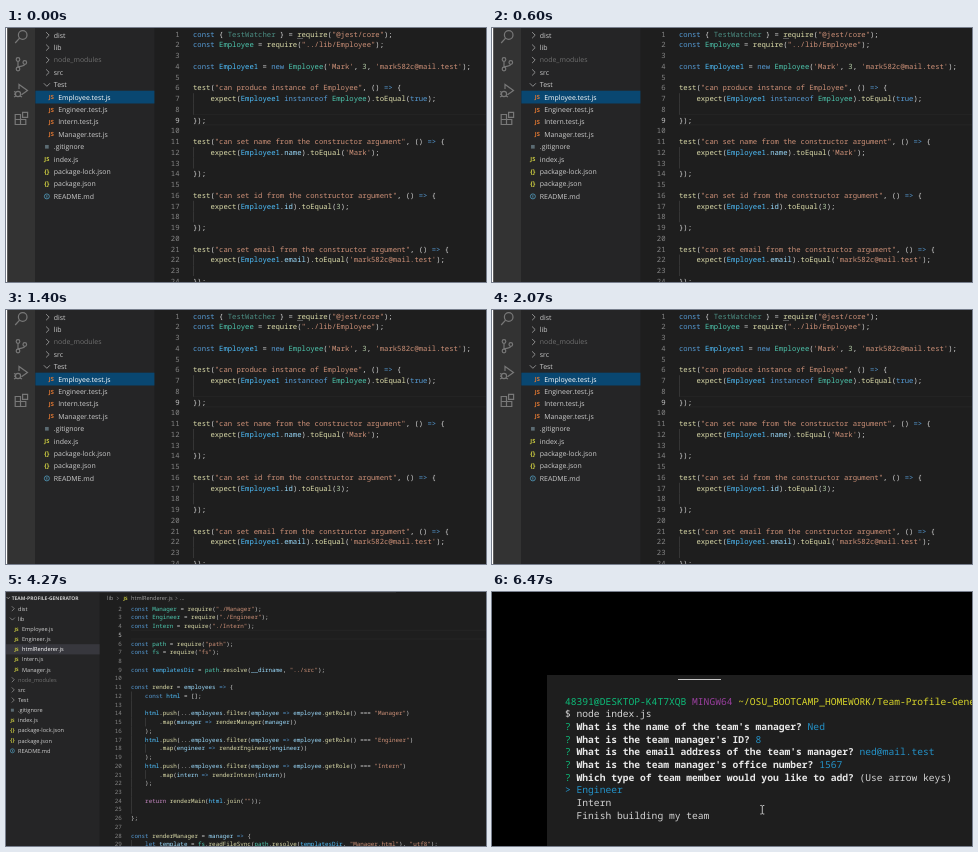
Recreate the animation shown at these times as an HTML page. Size 480 by 254 pixels, loop 8 s.

```html
<!DOCTYPE html>
<html lang="en">
<head>
<meta charset="utf-8">
<title>Team profile generator</title>
<style>
  html, body { margin: 0; width: 100%; height: 100%; overflow: hidden; background: #000; }
  #reel { display: block; animation: cuts 8s step-end infinite; }
  @keyframes cuts {
    0% { transform: translateY(0); }
    26.625% { transform: translateY(-254px); }
    53.375% { transform: translateY(-508px); }
    80%, 100% { transform: translateY(-762px); }
  }
  text { white-space: pre; text-rendering: geometricPrecision; fill: #d4d4d4; }
  .mono { font-family: "Noto Sans Mono", "DejaVu Sans Mono", monospace; }
  .code { font-weight: 500; }
  .ui { font-family: "Open Sans", "Noto Sans", sans-serif; fill: #ccc; }
  .b { font-weight: 700; fill: #e8e8e8; }
  .line { fill: none; stroke: #787878; }
</style>
</head>
<body>
<svg id="reel" width="480" height="1016"></svg>
<script>
const rect = (x, y, w, h, fill) => `<rect x="${x}" y="${y}" width="${w}" height="${h}" fill="${fill}"/>`;
const path = (d, stroke = '#858585', width = 1) =>
  `<path d="${d}" fill="none" stroke="${stroke}" stroke-width="${width}"/>`;
const text = (cls, x, y, size, body, extra = '') =>
  `<text class="${cls}" x="${x}" y="${y + size * 0.35}" font-size="${size}" ${extra}>${body}</text>`;
const ui = (x, y, size, body, fill = '#ccc', extra = '') =>
  text('ui', x, y, size, body, `style="fill:${fill}" ${extra}`);
const tint = (fill, body, extra = '') => `<tspan style="fill:${fill}" ${extra}>${body}</tspan>`;
const bold = body => `<tspan class="b">${body}</tspan>`;

// string, keyword, control, number, unused, constant, type, function, variable
const colors = ['#ce9178', '#569cd6', '#c586c0', '#b5cea8', '#4c8f84', '#4fc1ff', '#4ec9b0', '#dcdcaa', '#9cdcfe'];
const tokens = new RegExp([
  `("[^"]*"|'[^']*')`,
  '(=>|\\b(?:const|let|new|instanceof|true)\\b)',
  '\\b(return)\\b',
  '\\b(\\d+)\\b',
  '\\b(TestWatcher)\\b',
  '\\b(Employee1|templatesDir|html)\\b',
  '\\b(Employee|Manager|Engineer|Intern|path|fs)\\b',
  '(\\w+(?=\\()|\\brender(?:Manager)?\\b)',
  '(\\w+)'
].join('|'), 'g');
const paint = src => src.replace(tokens, (m, ...groups) =>
  tint(colors[groups.findIndex(g => g !== undefined)], m));

function code(lines, o) {
  let depth = 0;
  return lines.map((src, i) => {
    const n = o.first + i, y = o.y + i * o.pitch;
    if (src) depth = src.search(/\S/) / 4;
    // blank lines keep the indent guides of the line above
    const guides = Array.from({ length: depth }, (_, d) =>
      rect(o.x + d * 2.4 * o.size, y - o.pitch / 2, 0.7, o.pitch, '#404040')).join('');
    return guides + text('mono', o.numX, y, o.size, n,
        `text-anchor="end" style="fill:${n === o.current ? '#c6c6c6' : '#858585'}"`) +
      text('mono code', o.x, y, o.size, paint(src));
  }).join('');
}

// Each row: kind, label, depth
function tree(rows, o) {
  const s = o.size;
  return rows.map(([kind, label, depth = 0], i) => {
    const y = o.y + i * o.pitch, x = o.x + depth * o.indent, ix = x - s;
    const r = s * 0.22;
    const icon = {
      shut: () => path(`M${ix - r / 2} ${y - 2 * r}l${2 * r} ${2 * r}l${-2 * r} ${2 * r}`, '#bbb', s * 0.1),
      open: () => path(`M${ix - 2 * r} ${y - r}l${2 * r} ${2 * r}l${2 * r} ${-2 * r}`, '#bbb', s * 0.1),
      js: () => mark(ix, y, s, 'JS', '#cbcb41'),
      test: () => mark(ix, y, s, 'JS', '#e37933'),
      json: () => mark(ix, y, s * 1.15, '{}', '#cbcb41'),
      git: () => rect(ix - r * 1.2, y - r * 1.2, r * 2.4, r * 2.4, '#5b6b73'),
      info: () => `<circle cx="${ix}" cy="${y}" r="${s * 0.36}" class="line" style="stroke:#519aba" stroke-width="${s * 0.12}"/>` +
        rect(ix - s * 0.06, y - s * 0.17, s * 0.12, s * 0.34, '#519aba')
    }[kind]();
    return icon + ui(x, y, s, label, label === 'node_modules' ? '#6f6f6f' : label === o.selected ? '#fff' : '#ccc');
  }).join('');
}
const mark = (x, y, s, label, fill) =>
  ui(x, y, s * 0.82, label, fill, 'text-anchor="middle" font-weight="700"');

const roots = [
  ['git', '.gitignore'], ['js', 'index.js'], ['json', 'package-lock.json'],
  ['json', 'package.json'], ['info', 'README.md']
];
const testCase = (title, ...body) => [`test("${title}", () => {`, ...body.map(b => '    ' + b), '', '});', ''];
const testCode = [
  'const { TestWatcher } = require("@jest/core");',
  'const Employee = require("../lib/Employee");',
  '',
  "const Employee1 = new Employee('Mark', 3, 'mark582c@mail.test');",
  '',
  ...testCase('can produce instance of Employee', 'expect(Employee1 instanceof Employee).toEqual(true);'),
  ...testCase('can set name from the constructor argument', "expect(Employee1.name).toEqual('Mark');"),
  ...testCase('can set id from the constructor argument', 'expect(Employee1.id).toEqual(3);'),
  ...testCase('can set email from the constructor argument', "expect(Employee1.email).toEqual('mark582c@mail.test');")
].slice(0, 24);

const pushRole = role => {
  const name = role.toLowerCase();
  return [
    `    html.push(...employees.filter(employee => employee.getRole() === "${role}")`,
    `        .map(${name} => render${role}(${name}))`,
    '    );'
  ];
};
const renderCode = [
  ...['Manager', 'Engineer', 'Intern'].map(r => `const ${r} = require("./${r}");`),
  '',
  'const path = require("path");',
  'const fs = require("fs");',
  '',
  'const templatesDir = path.resolve(__dirname, "../src");',
  '',
  'const render = employees => {',
  '    const html = [];',
  '',
  ...['Manager', 'Engineer', 'Intern'].flatMap(pushRole),
  '',
  '    return renderMain(html.join(""));',
  '',
  '};',
  '',
  'const renderManager = manager => {',
  '    let template = fs.readFileSync(path.resolve(templatesDir, "Manager.html"), "utf8");'
];

const activityIcons = `<g class="line" stroke-width="1.2">
  <circle cx="16.7" cy="7" r="4.3"/><path d="M13.6 10.2L9.2 15"/>
  <circle cx="12" cy="31.5" r="1.8"/><circle cx="12" cy="41" r="1.8"/><circle cx="18.8" cy="34.5" r="1.8"/>
  <path d="M12 33.3V39.2M18.8 36.3C18.6 38.6 14 37.5 12.4 39.2"/>
  <path d="M13 61V56.5L21.5 62.5L15.5 66.8"/>
  <circle cx="12" cy="66" r="2.6"/><path d="M8 63.5l2 1M8 66.2h1.4M8 69l2-1M16 69l-2-1"/>
  <path d="M9.2 86.5H14.5V96.5H9.2ZM9.2 91.5H19.8V96.5H14.5M16.6 84.3H21.6V89.3H16.6Z"/>
</g>`;

function testEditor() {
  return rect(0, 0, 480, 254, '#1e1e1e') + rect(0, 0, 29.4, 254, '#333') + rect(29.4, 0, 119, 254, '#252526') +
    rect(0, 0, 1.2, 254, '#fff') + rect(29.4, 62.7, 119, 12.8, '#094771') + activityIcons +
    tree([
      ['shut', 'dist'], ['shut', 'lib'], ['shut', 'node_modules'], ['shut', 'src'], ['open', 'Test'],
      ...['Employee', 'Engineer', 'Intern', 'Manager'].map(n => ['test', n + '.test.js', 1]),
      ...roots
    ], { x: 47.8, y: 7.2, pitch: 12.4, indent: 4.4, size: 6.93, selected: 'Employee.test.js' }) +
    path('M187 86.6H480M187 96.8H480', '#262626', 0.8) +
    code(testCode, { first: 1, x: 187, y: 6, pitch: 10.76, size: 7.24, numX: 173.5, current: 9 }) +
    [0, 2, 4].map(d => rect(291.5 + d, 10, 1, 1, '#999')).join('');
}

function testRun() {
  const row = (y, body) => text('mono', 9, y, 8.03, body);
  const pass = ['Engineer', 'Employee', 'Manager', 'Intern'].map((n, i) =>
    row(215.5 + i * 10.55, tint('#3a6a56', ' PASS ') + ` Test/${bold(n + '.test.js')}`)).join('');
  const tabs = [[9, 'PROBLEMS'], [60, 'OUTPUT'], [104, 'TERMINAL'], [153, 'DEBUG CONSOLE']].map(([x, t]) =>
    ui(x, 156, 6.95, t, t === 'TERMINAL' ? '#e7e7e7' : '#979797')).join('');
  return rect(0, 0, 480, 254, '#1e1e1e') +
    code(testCode.slice(3, 14), { first: 4, x: 40, y: 11.5, pitch: 12.5, size: 8.44, numX: 22 }) +
    rect(0, 142, 480, 1, '#414141') + tabs + rect(104, 164, 34, 0.9, '#e7e7e7') +
    row(184, '&gt; Team-Profile-Generator@1.0.0 test C:\\Users\\48391\\OSU_BOOTCAMP_HOMEWORK\\Team-Profile-Generator') +
    row(194.5, '&gt; jest') + rect(9, 210, 28.9, 42.2, '#0fb87c') + pass;
}

function renderEditor() {
  return rect(0, 0, 480, 254, '#1e1e1e') + rect(0, 0, 93.6, 254, '#252526') + rect(0, 52.2, 93.6, 10.2, '#37373d') +
    rect(0, 0, 390, 0.8, '#303031') + path('M.6 5l1.6 1.8L3.8 5', '#bbb', 0.6) +
    ui(5.7, 6.3, 4.98, 'TEAM-PROFILE-GENERATOR', '#ccc', 'font-weight="700"') +
    tree([
      ['shut', 'dist'], ['open', 'lib'],
      ...['Employee', 'Engineer', 'htmlRenderer', 'Intern', 'Manager'].map(n => ['js', n + '.js', 1]),
      ['shut', 'node_modules'], ['shut', 'src'], ['shut', 'Test'],
      ...roots
    ], { x: 12, y: 16.7, pitch: 10.15, indent: 4, size: 5.6, selected: 'htmlRenderer.js' }) +
    ui(101, 6.3, 5.6, 'lib', '#a0a0a0') + path('M111 4.8l1.5 1.5l-1.5 1.5', '#909090', 0.6) +
    mark(119.4, 6.3, 5.6, 'JS', '#cbcb41') + ui(125, 6.3, 5.6, 'htmlRenderer.js', '#a0a0a0') +
    path('M169.6 4.8l1.5 1.5l-1.5 1.5', '#909090', 0.6) + ui(174, 6.3, 5.6, '...', '#a0a0a0') +
    path('M125 38.3H480M125 47H480', '#272727', 0.8) +
    code(renderCode, { first: 2, x: 125, y: 16.6, pitch: 8.73, size: 5.885, numX: 115.8, current: 5 });
}

function prompt() {
  const cyan = '#2492c8', green = '#0dbc79';
  const ask = (q, answer) => tint(green, '? ') + bold(q) + ' ' + answer;
  const rows = [
    tint(green, '48391@DESKTOP-K4T7XQB') + ' ' + tint('#9a3f9f', 'MINGW64') + ' ' +
      tint('#d9d62a', '~/OSU_BOOTCAMP_HOMEWORK/Team-Profile-Generator', 'font-weight="500"'),
    '$ node index.js',
    ask("What is the name of the team's manager?", tint(cyan, 'Ned')),
    ask("What is the team manager's ID?", tint(cyan, '8')),
    ask("What is the email address of the team's manager?", tint(cyan, 'ned@mail.test')),
    ask("What is the team manager's office number?", tint(cyan, '1567')),
    ask('Which type of team member would you like to add?', '(Use arrow keys)'),
    tint(cyan, '&gt; Engineer'),
    '  Intern',
    '  Finish building my team'
  ];
  return rect(0, 0, 480, 254, '#000') + rect(55, 83, 425, 171, '#1e1e1e') + rect(186, 87, 43, 1, '#c8c8c8') +
    rows.map((r, i) => text('mono', 73, 109.2 + i * 12.67, 9.63, r)).join('') +
    path('M268.3 213.5h1.4l.6 .6l.6-.6h1.4M270.3 214v7.5M268.3 222h1.4l.6-.6l.6 .6h1.4', '#d0d0d0', 0.9);
}

document.getElementById('reel').innerHTML = [testEditor, testRun, renderEditor, prompt].map((scene, i) =>
  `<svg y="${i * 254}" width="480" height="254" overflow="hidden">${scene()}</svg>`).join('');
</script>
</body>
</html>
```
